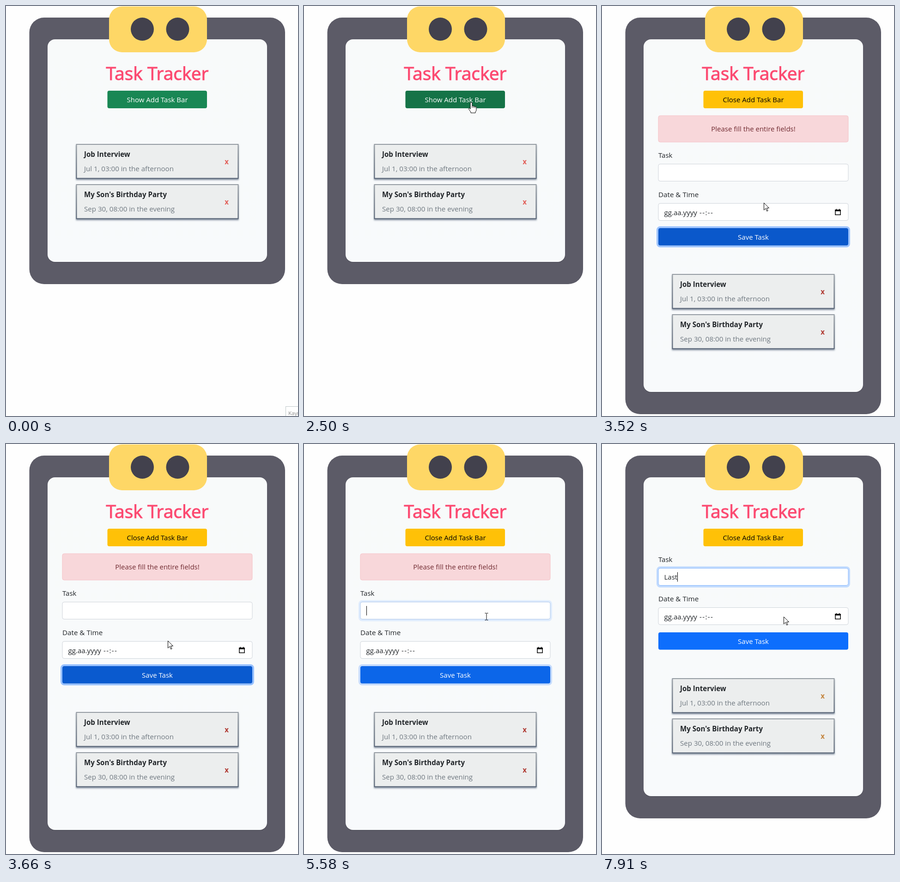
Recreate the animation shown at these times as an HTML page. Size 632x886 px, loop 8000 ms.

```html
<!DOCTYPE html>
<html lang="en">
<head>
<meta charset="utf-8">
<title>Task list</title>
<style>
html, body { margin: 0; width: 100%; height: 100%; overflow: hidden; background: #fefefe; }
svg { display: block; width: 100%; height: 100%; font: 15px "Open Sans", "Noto Sans", sans-serif; fill: #212529; }
.mid { text-anchor: middle; }
.title { font-size: 39px; fill: #fc4a71; stroke: #fc4a71; stroke-width: 1; }
.bold { font-weight: 700; font-size: 15.1px; }
.when { font-size: 15.1px; fill: #6f7880; }
.field { fill: #fff; stroke: #ced4da; }
.ring { fill: none; stroke-width: 4; }
.card { fill: #eceeee; stroke: url(#edge); stroke-width: 2; filter: url(#drop); }
#cursor path { fill: #fff; stroke: #000; stroke-linejoin: round; }
</style>
</head>
<body>
<svg viewBox="0 0 632 886" preserveAspectRatio="none">
  <defs>
    <linearGradient id="edge" x2="0" y2="1">
      <stop offset="0" stop-color="#959ca3"/>
      <stop offset=".3" stop-color="#7d8690"/>
      <stop offset="1" stop-color="#566274"/>
    </linearGradient>
    <linearGradient id="sheet" x2="0" y2="1">
      <stop offset="0" stop-color="#f8fafa"/>
      <stop offset="1" stop-color="#f8fafc"/>
    </linearGradient>
    <filter id="drop" x="-5%" y="-10%" width="110%" height="130%">
      <feDropShadow dx="0" dy="2.5" stdDeviation="1.8" flood-color="#2c3a54" flood-opacity=".55"/>
    </filter>
  </defs>

  <rect id="board" x="50.5" y="25" width="553.5" rx="32" fill="#5c5b67"/>
  <rect id="shade" x="90" y="73.5" width="475" rx="16" fill="#494853" opacity=".6"/>
  <rect id="paper" x="90" y="72" width="475" rx="16" fill="url(#sheet)"/>
  <rect x="223" y="1" width="212" height="99" rx="28" fill="#fed766"/>
  <circle cx="295" cy="50" r="25" fill="#42414d"/>
  <circle cx="371.5" cy="50" r="25" fill="#42414d"/>

  <text class="mid title" x="327.5" y="160">Task Tracker</text>
  <rect id="toggle" x="219.5" y="183" width="215.5" height="38" rx="4"/>
  <text id="toggleText" class="mid" x="327.5" y="208"></text>

  <g id="alert">
    <rect x="122" y="237" width="411" height="57" rx="4" fill="#f8d7da" stroke="#f5c2c7"/>
    <text class="mid" x="327.5" y="271" fill="#702a30">Please fill the entire fields!</text>
  </g>

  <g id="form">
    <text x="122" y="255">Task</text>
    <rect id="taskRing" class="ring" x="120" y="266.5" width="415" height="41.5" rx="6" stroke="#c2dbfe"/>
    <rect id="task" class="field" x="122" y="268.5" width="411" height="37" rx="4"/>
    <text id="typed" x="134.5" y="293"></text>
    <path id="caret" d="M.5 277v20.5" stroke="#000"/>

    <text x="122" y="340" font-size="15.2">Date &amp; Time</text>
    <rect class="field" x="122" y="353.5" width="411" height="37" rx="4"/>
    <text x="134.5" y="379">gg.aa.yyyy</text>
    <text x="211" y="379" letter-spacing="1.4">--:--</text>
    <path d="M505 367.7h11v10.6h-11z" fill="none" stroke="#000" stroke-width="1.5"/>
    <path d="M504.5 367h12v3.5h-12zM506.5 365.5h1.6v2h-1.6zM513 365.5h1.6v2H513z" fill="#000"/>

    <rect id="saveRing" class="ring" x="120" y="405" width="415" height="41.5" rx="6" stroke="#98c1fe"/>
    <rect id="save" x="122" y="407" width="411" height="37.5" rx="4"/>
    <text class="mid" x="327.5" y="432" fill="#fff">Save Task</text>
  </g>

  <g id="list"></g>

  <g id="tip">
    <rect x="605.5" y="865.5" width="60" height="40" fill="#fff" stroke="#bfc7c9"/>
    <text x="611" y="884" font-size="11.5" fill="#8b8b8b">Kayıt</text>
  </g>

  <g id="cursor">
    <path id="arrow" d="M.5 .5V16l3.7-3.6 2.6 6 2.3-1-2.5-5.8h5z"/>
    <path id="hand" d="M-2 14V2a2 2 0 0 1 4 0V8.5a1.8 1.8 0 0 1 3.3.8a1.7 1.7 0 0 1 3 .9a1.5 1.5 0 0 1 2.7 1.3V16q0 3-2 5v2H-1v-2L-5 15.5q-1.5-2.5.5-3q1.3 0 2.5 2zM2 8.5V12M5.3 9.3V12M8.3 10.2V12.5"/>
    <path id="beam" d="M-3.5-7.5h3M.5-7.5h3M0-7V7M-3.5 7.5h3M.5 7.5h3"/>
  </g>
</svg>

<script>
const LOOP = 8000, STEP = 68, FADE = 150;
const OPEN = 2570, PRESS = 3380, FAIL = 3520, FOCUS = 5510, TYPE = 6970;
const FORM_H = 208, ALERT_H = 73, CARD_H = 87;
const el = id => document.getElementById(id);
const set = (id, name, value) => el(id).setAttribute(name, value);
const show = (id, on) => { el(id).style.display = on ? "" : "none"; };
const clamp = v => Math.min(1, Math.max(0, v));

// time, x, y of the pointer's hot spot
const moves = [
  [940, 581, 805], [1145, 553, 620], [1350, 518, 455], [1555, 430, 285], [1690, 399, 233],
  [1760, 388, 217], [1970, 371, 191], [2170, 371, 191], [2300, 362, 208],
  [2500, 362, 208], [2850, 349, 330], [3250, 350, 425],
  [4060, 350, 425], [4810, 344, 498], [4880, 344, 498], [5300, 385, 400], [5440, 395, 373],
  [7910, 393, 373]
];
// time, colour: each colour fades in from the one before
const toggleTones = [[0, "#198754"], [1760, "#157347"], [OPEN, "#ffc51a"], [PRESS, "#ffc107"]];
const saveTones = [[0, "#0d6efd"], [3180, "#0b5ed7"], [PRESS, "#0a58ca"], [3600, "#0b5ed7"], [FOCUS, "#0d6efd"]];
const letters = [[TYPE, "L"], [7160, "a"], [7290, "s"], [7570, "t"]];

el("list").innerHTML = [
  ["Job Interview", "Jul 1, 03:00 in the afternoon"],
  ["My Son's Birthday Party", "Sep 30, 08:00 in the evening"]
].map(([name, when], i) => `<g transform="translate(0 ${i * CARD_H})">
  <rect class="card" x="152.5" y="299" width="350" height="73.5"/>
  <text class="bold" x="169" y="326">${name}</text>
  <text class="when" x="169" y="357">${when}</text>
  <text class="bold mid cross" x="477.5" y="342">x</text></g>`).join("");
const crosses = document.querySelectorAll(".cross");

function mix(a, b, p) {
  const part = (c, i) => parseInt(c.slice(i, i + 2), 16);
  return `rgb(${[1, 3, 5].map(i => Math.round(part(a, i) + (part(b, i) - part(a, i)) * p))})`;
}

const lastIndex = (rows, t) => rows.reduce((n, row, i) => row[0] <= t ? i : n, 0);

function tone(rows, t) {
  const i = lastIndex(rows, t);
  const from = rows[Math.max(0, i - 1)][1];
  return mix(from, rows[i][1], clamp((t - rows[i][0]) / FADE));
}

function pointerAt(t) {
  const i = lastIndex(moves, t);
  const [t0, x0, y0] = moves[i];
  const [t1, x1, y1] = moves[i + 1] || [LOOP, x0, y0];
  // rests hold still until the next key
  if (t1 - t0 > 1000) return [x0, y0];
  const p = clamp(Math.floor((t - t0) / STEP) * STEP / (t1 - t0));
  return [x0 + (x1 - x0) * p, y0 + (y1 - y0) * p];
}

function drawPointer(t, open, shift) {
  const on = t >= 940 && (t < TYPE || t >= 7910);
  show("cursor", on);
  if (!on) return;
  const [x, y] = pointerAt(t);
  const over = (top, height) => y >= top && y <= top + height;
  const hand = over(183, 38) || open && over(407 + shift, 38);
  const beam = open && over(268.5 + shift, 37.5);
  show("hand", hand);
  show("beam", beam);
  show("arrow", !hand && !beam);
  set("cursor", "transform", `translate(${Math.round(x)} ${Math.round(y)})`);
}

function draw(t) {
  const open = t >= OPEN, failed = t >= FAIL && t < TYPE;
  const shift = failed ? ALERT_H : 0;
  const drop = open ? FORM_H + shift : 0;

  set("board", "height", 576 + drop);
  set("paper", "height", 481 + drop);
  set("shade", "height", 481 + drop);
  set("list", "transform", `translate(0 ${drop})`);
  set("form", "transform", `translate(0 ${shift})`);
  show("form", open);
  show("alert", failed);
  show("tip", t < 70);

  set("toggle", "fill", tone(toggleTones, t));
  set("toggleText", "fill", open ? "#000" : "#fff");
  el("toggleText").textContent = (open ? "Close" : "Show") + " Add Task Bar";
  const cross = !open ? "#e2605a" : failed ? "#b03a32" : t < FAIL ? "#c0682c" : "#c4853f";
  crosses.forEach(c => c.setAttribute("fill", cross));

  const focus = clamp((t - FOCUS) / FADE);
  set("save", "fill", tone(saveTones, t));
  set("saveRing", "opacity", clamp((t - PRESS) / FADE) * (1 - focus));
  set("taskRing", "opacity", focus);
  el("task").style.stroke = mix("#ced4da", "#86b7fe", focus);

  const typed = letters.filter(row => row[0] <= t).map(row => row[1]).join("");
  el("typed").textContent = typed;
  const width = typed ? el("typed").getComputedTextLength() : 0;
  set("caret", "transform", `translate(${Math.round(134.5 + width)} 0)`);
  show("caret", t >= FOCUS && (t >= TYPE || t < 6040 || t >= 6570));

  drawPointer(t, open, shift);
}

function tick() {
  draw(performance.now() % LOOP);
  requestAnimationFrame(tick);
}
tick();
</script>
</body>
</html>
```
